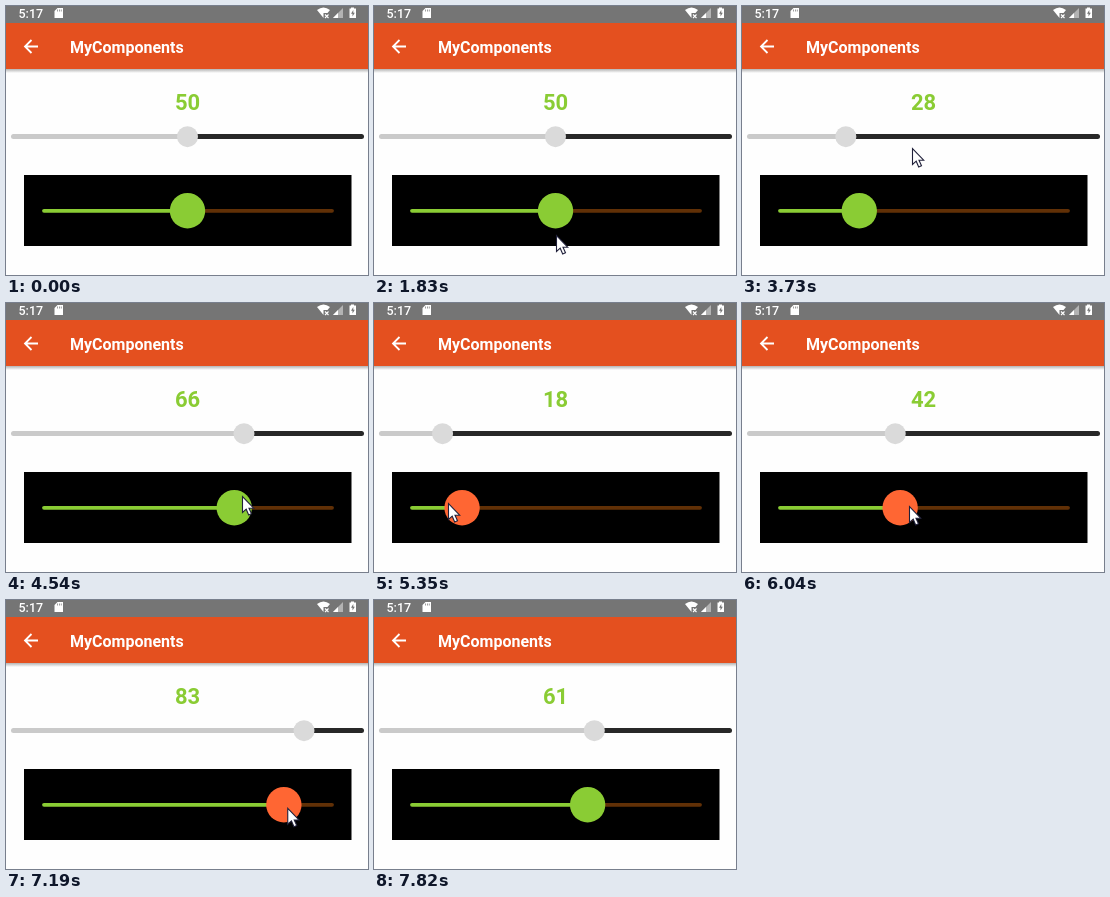
An HTML page that plays this animation: 362 px wide and 269 px high, repeating every 8.25 s.

```html
<!DOCTYPE html>
<html lang="en">
<head>
<meta charset="utf-8">
<title>Slider demo</title>
<style>
html, body { margin: 0; width: 100%; height: 100%; overflow: hidden; background: #fefefe; }
svg { display: block; width: 362px; height: 269px; font-family: Roboto, sans-serif; }
line { stroke-linecap: round; }
</style>
</head>
<body>
<svg viewBox="0 0 362 269">
  <defs>
    <linearGradient id="shade" x2="0" y2="1">
      <stop stop-color="#b4b4b4"/>
      <stop offset="1" stop-color="#fefefe"/>
    </linearGradient>
  </defs>
  <rect width="362" height="269" fill="#fefefe"/>
  <rect y="63" width="362" height="4" fill="url(#shade)"/>
  <rect width="362" height="17" fill="#757575"/>
  <rect y="17" width="362" height="46" fill="#e4501f"/>

  <!-- status bar -->
  <g fill="#fff">
    <text x="12.5" y="11.5" font-size="12.5" font-weight="500">5:17</text>
    <path d="M51.5 2H57V12H48.5V5Z"/>
    <path d="M311 4Q317.5 -1 324 4L321.5 7H317.5V12Z"/>
    <path d="M337 2V12H327Z" opacity=".45"/>
    <path d="M332 7V12H327Z"/>
    <path d="M345 1.5H348V2.5H350V12H343.5V2.5H345Z"/>
  </g>
  <path d="M51.5 3.5V5.5M53.5 3.5V5.5M55.3 3.5V5.5" stroke="#757575" stroke-width=".7"/>
  <path d="M319 8.5L322.5 12M322.5 8.5L319 12" stroke="#fff" stroke-width="1.1"/>
  <path d="M347.3 4L345 7.8H346.5V10.5L348.8 6.7H347.3Z" fill="#757575"/>

  <!-- app bar -->
  <path d="M32 40.5H19.5M25.5 34L19 40.5L25.5 47" fill="none" stroke="#fff" stroke-width="1.8"/>
  <text x="64" y="46.8" font-size="16" font-weight="700" fill="#fff">MyComponents</text>

  <text id="label" x="181.5" y="104" font-size="22" font-weight="700" fill="#8acc34" text-anchor="middle"></text>

  <g stroke-width="5">
    <line id="topRest" x2="355.5" y1="130.5" y2="130.5" stroke="#282828"/>
    <line id="topFill" x1="7.5" y1="130.5" y2="130.5" stroke="#cacaca"/>
  </g>
  <circle id="topKnob" cy="130.7" r="10.5" fill="#dadada"/>

  <rect x="18" y="169" width="327.500" height="71"/>
  <g stroke-width="3.8">
    <line id="lowRest" x2="326" y1="204.8" y2="204.8" stroke="#613006"/>
    <line id="lowFill" x1="38" y1="204.8" y2="204.8" stroke="#8acc34"/>
  </g>
  <circle id="lowKnob" cy="204.7" r="17.7"/>

  <path id="cursor" d="M.5 .5V16.5L4.2 13.2L6.7 19L9.5 17.8L7 12.2H11.7Z"
        fill="#fff" stroke="#20203a" stroke-width="1.1"/>
</svg>
<script>
const LOOP = 8250, STEP = 143;
const PRESS = 4790, RELEASE = 7580;

// Turning points of the drag; everything between is interpolated.
const poses = [
  { t: 1830, value: 50.2, x: 182, y: 229 },
  { t: 2740, value: 49.4, x: 170, y: 131 },
  { t: 3450, value: 25, x: 84, y: 138 },
  { t: 3730, value: 28, x: 170, y: 142 },
  { t: 4270, value: 66, x: 237, y: 152 },
  { t: 4540, value: 66, x: 236, y: 193 },
  { t: 4930, value: 65, x: 230, y: 202 },
  { t: 5350, value: 18, x: 74, y: 200 },
  { t: 5610, value: 16, x: 80, y: 203 },
  { t: 6580, value: 77, x: 283, y: 203 },
  { t: 7030, value: 90, x: 304, y: 206 },
  { t: 7580, value: 61, x: 213, y: 213 },
  { t: 7820, value: 61, x: 215, y: 257 }
];
const first = poses[0], last = poses[poses.length - 1];

const el = id => document.getElementById(id);
const set = (id, name, value) => el(id).setAttribute(name, value);

// Each stretch between poses advances in equal jumps of about STEP ms.
function poseAt(t) {
  if (t < first.t) return first;
  if (t >= last.t) return last;
  const next = poses.findIndex(pose => pose.t > t);
  const a = poses[next - 1], b = poses[next];
  const span = b.t - a.t, steps = Math.round(span / STEP);
  const part = Math.floor((t - a.t) / span * steps) / steps;
  const mix = key => a[key] + (b[key] - a[key]) * part;
  return { t: mix("t"), value: mix("value"), x: mix("x"), y: mix("y") };
}

function moveSlider(name, x) {
  set(name + "Rest", "x1", x);
  set(name + "Fill", "x2", x);
  set(name + "Knob", "cx", x);
}

function draw(t) {
  const pose = poseAt(t), value = Math.round(pose.value);
  const pressed = pose.t >= PRESS && pose.t < RELEASE;

  el("label").textContent = value;
  moveSlider("top", 5 + 3.53 * value);
  moveSlider("low", 35.5 + 2.92 * value);
  set("lowKnob", "fill", pressed ? "#ff6633" : "#8acc34");
  set("cursor", "visibility", t >= first.t && t < last.t ? "visible" : "hidden");
  set("cursor", "transform", `translate(${pose.x} ${pose.y})`);
}

const begin = performance.now();
function tick() {
  draw((performance.now() - begin) % LOOP);
  requestAnimationFrame(tick);
}
tick();
</script>
</body>
</html>
```
